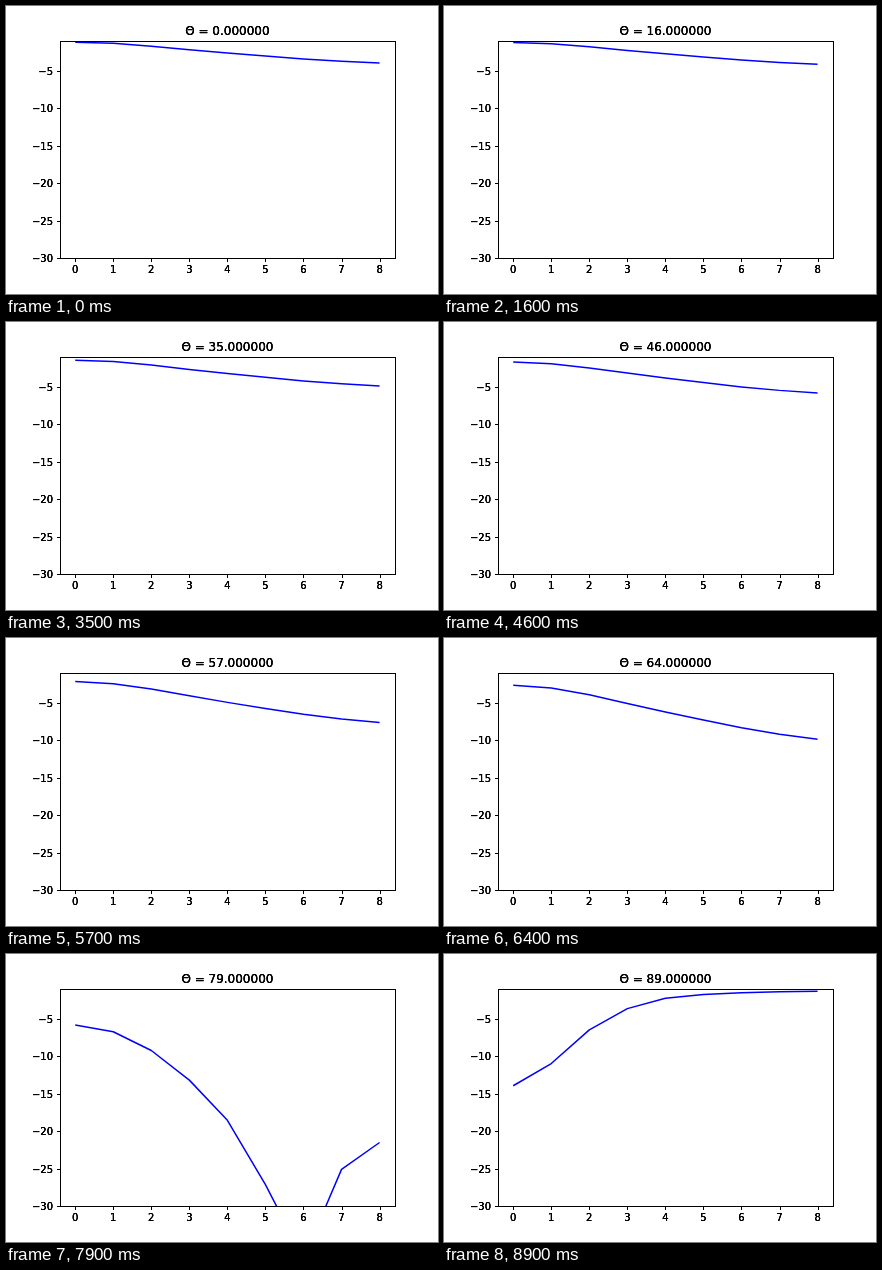
Animation of 432 by 288 pixels, one loop 9 s. Source, as an HTML page:

```html
<!DOCTYPE html>
<html lang="en">
<head>
<meta charset="utf-8">
<title>Reflection by angle</title>
<style>
  html, body { margin: 0; width: 100%; height: 100%; overflow: hidden; background: #fff; }
  svg { display: block; width: 432px; height: 288px; }
  text { font-family: "DejaVu Sans", sans-serif; font-size: 10px; }
  #title { font-size: 12px; }
  #axes { fill: none; stroke: #000; stroke-width: 1; }
  #curve { fill: none; stroke: #00f; stroke-width: 1.5; stroke-linejoin: round; }
</style>
</head>
<body>
<svg viewBox="0 0 432 288">
  <clipPath id="plot"><rect x="54" y="34.56" width="334.8" height="217.44"/></clipPath>
  <g clip-path="url(#plot)"><polyline id="curve"/></g>
  <g id="axes"><rect x="54.5" y="35.5" width="335" height="217"/></g>
  <g id="labels"><text id="title" x="221.4" y="29" text-anchor="middle"></text></g>
  <!-- layered copies darken the antialiased glyph edges -->
  <use href="#labels"/>
  <use href="#labels"/>
</svg>
<script>
  const STEP_MS = 100, STEPS = 90;
  // Normalised admittance at each x: slope * cos(angle) + offset
  const SLOPE = [13.87, 12.33, 9.757, 7.79, 6.55, 5.71, 5.095, 4.69, 4.43];
  const OFFSET = [0.424, 0.345, 0.188, 0.0726, 0.0175, 0.0024, 0, 0, 0];

  const byId = id => document.getElementById(id);
  const curve = byId("curve"), title = byId("title");
  const px = x => 54 + 334.8 * (x + 0.4) / 8.8;
  const py = v => 252 - 217.44 * (v + 30) / 29;
  const snap = v => Math.floor(v + 0.5) + 0.5;

  function add(parent, tag, attrs, text = "") {
    const el = document.createElementNS("http://www.w3.org/2000/svg", tag);
    for (const key in attrs) el.setAttribute(key, attrs[key]);
    el.textContent = text;
    byId(parent).append(el);
  }

  for (let i = 0; i <= 8; i++) {
    add("axes", "path", { d: `M${snap(px(i))} 252.5v3.5` });
    add("labels", "text", { x: px(i), y: 267, "text-anchor": "middle" }, i);
  }
  for (let v = 5; v <= 30; v += 5) {
    const y = snap(py(-v));
    add("axes", "path", { d: `M54.5 ${y}h-3.5` });
    add("labels", "text", { x: 47, y: y + 3.5, "text-anchor": "end" }, "\u2212" + v);
  }

  function decibels(i, cos) {
    const y = SLOPE[i] * cos + OFFSET[i];
    return 20 * Math.log10(Math.max(Math.abs((1 - y) / (1 + y)), 1e-4));
  }

  let shown = -1;
  function draw(now) {
    const angle = Math.floor(now / STEP_MS) % STEPS;
    if (angle !== shown) {
      shown = angle;
      const cos = Math.cos(angle * Math.PI / 180);
      curve.setAttribute("points", SLOPE.map((_, i) => `${px(i)},${py(decibels(i, cos))}`).join(" "));
      title.textContent = `\u0398 = ${angle.toFixed(6)}`;
    }
    requestAnimationFrame(() => draw(performance.now() - start));
  }
  const start = performance.now();
  draw(0);
</script>
</body>
</html>
```
